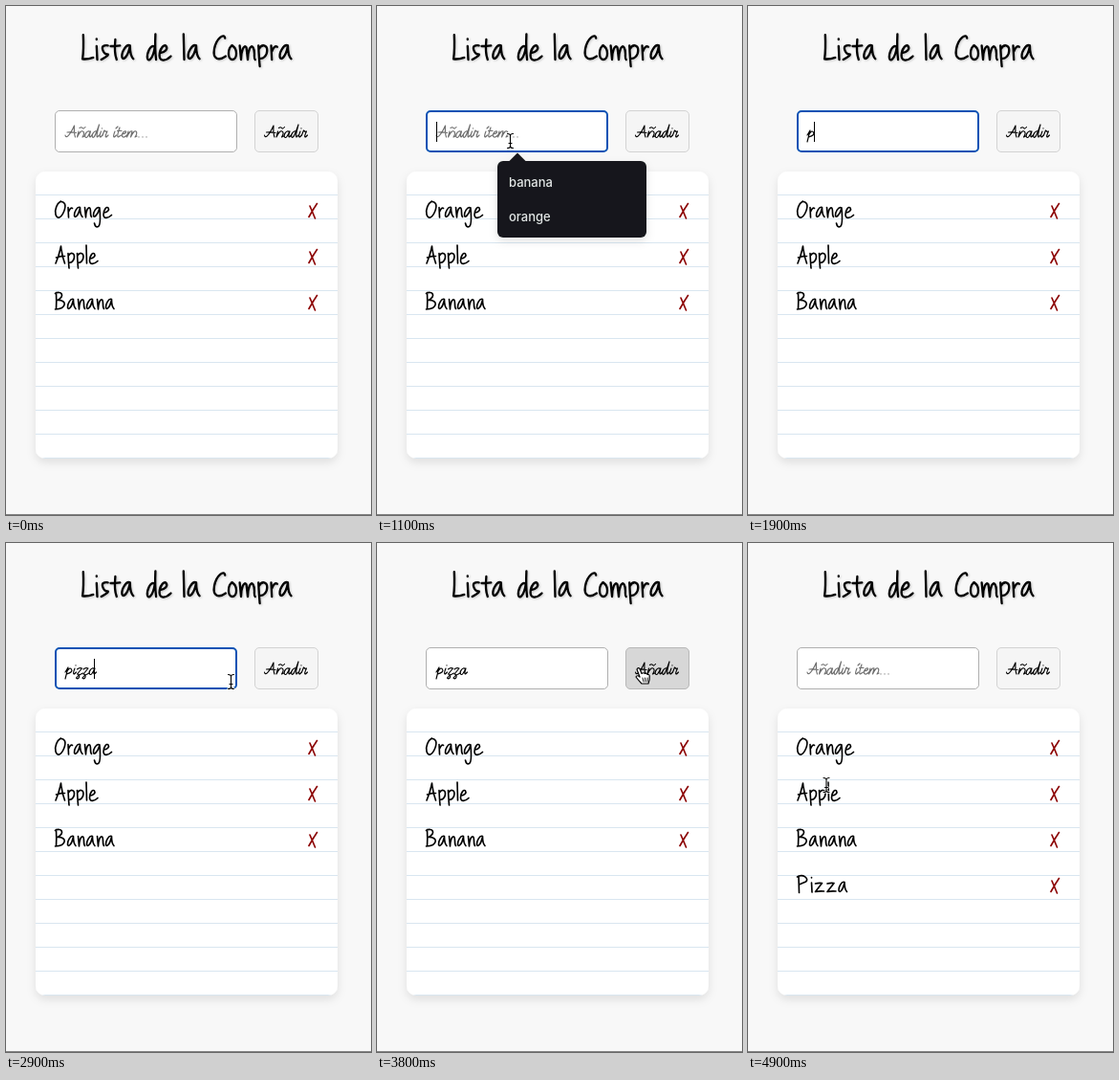
These frames come from a looping animation (382x532 px, 5 s). An HTML page:

```html
<!DOCTYPE html>
<html lang="es">
<head>
<meta charset="utf-8">
<title>Lista de la Compra</title>
<style>
html, body { margin: 0; width: 100%; height: 100%; overflow: hidden; background: #f8f8f8; }
svg { display: block; width: 382px; height: 532px; }
.pen { fill: none; stroke-linecap: round; stroke-linejoin: round; }
.menu { font: 500 13px Inter, Roboto, sans-serif; fill: #e3e5e6; }
</style>
</head>
<body>
<svg id="stage" viewBox="0 0 382 532">
  <defs>
    <clipPath id="sheet"><rect x="31" y="173" width="316" height="300" rx="10"/></clipPath>
    <filter id="soft" x="-10%" y="-10%" width="120%" height="125%">
      <feDropShadow dx="0" dy="4" stdDeviation="5" flood-opacity=".1"/>
    </filter>
    <filter id="glow" x="-10%" y="-30%" width="120%" height="170%">
      <feDropShadow dx="1" dy="1" stdDeviation="1" flood-opacity=".2"/>
    </filter>
  </defs>
  <rect width="382" height="532" fill="#f8f8f8"/>
  <rect y="531" width="382" height="1" fill="#858585"/>
  <rect x="31" y="173" width="316" height="300" rx="10" fill="#fff" filter="url(#soft)"/>
  <g id="rules" clip-path="url(#sheet)" fill="#d9e6f0"></g>
  <g id="heading" filter="url(#glow)"></g>
  <g id="items"></g>
  <rect id="field" fill="#fff"/>
  <g id="entry"></g>
  <rect id="caret" y="121" width="1" height="21"/>
  <rect id="button" x="260.5" y="109.5" width="66" height="43" rx="4.5"/>
  <g id="label"></g>
  <g id="popup" filter="url(#soft)">
    <path d="M138 162.500L147 153.500L156 162.500Z" fill="#15191b"/>
    <rect x="126" y="162" width="156" height="80" rx="6" fill="#15191b"/>
    <text class="menu" x="138" y="189">banana</text>
    <text class="menu" x="138" y="225">orange</text>
  </g>
  <g id="pointer"></g>
</svg>
<script>
const LOOP = 5000, STEP = 100;
const $ = id => document.getElementById(id);

function add(parent, tag, attrs) {
  const node = document.createElementNS("http://www.w3.org/2000/svg", tag);
  for (const key in attrs) node.setAttribute(key, attrs[key]);
  return parent.appendChild(node);
}

// Pen strokes: advance width, then a path on the baseline.
const marker = {
  " ": "8 M0 0",
  A: "13 M1.500 0Q5-8 7-18Q8-8 11 0M2-6Q6-8 11-7.500",
  B: "13 M2-17.500Q2.500-8 2 0M1-16.500C7-20 12-14 3.500-9.500C14-10 13-.5 1 0",
  C: "11 M9.500-16C9-20 3-16 1.500-8S5 1 10-2.500",
  L: "10.5 M2-18.500Q2.500-8 1.500-.5Q5 0 9.500-1.500",
  O: "13 M7-17C3-15 0-8 1.500-3S7 1 10-6S11-17 6-16.500",
  P: "14.5 M2.500-17L3 .5M1-16C7-20 14-14 10-11T3-8",
  X: "11 M2.500-12Q5.500-5 8 1M10-14.500Q5-7 1.500-.5",
  a: "11 M7-10.500C4-12 .5-5 1-2S5-1 7-10Q7-3 9.500-.5",
  d: "9 M6.500-9.500C3-12 .5-4 1-1S5 0 6.500-9M7-19Q6.500-8 7.500 0",
  e: "9.5 M1.500-5C5-5 7.500-8 6-10S1-8 1-3S6 1 9.500-2.500",
  g: "10.5 M7.500-10C4-12 .5-5 1-2S5-2 7.500-9.500Q9 8 6 9.500T2 6",
  i: "4 M1.500-10L2 0M1.500-15v-.5",
  l: "4 M1.500-19L2 0",
  m: "13.5 M1-10.500L2 0C2-6 4-12 6-9L7 0C7-6 9-12 11-9S11-1 12.500 0",
  n: "9 M1-10.500L2 0C2-6 4-11 6-10S6-2 8-.5",
  o: "8.5 M4-10.500C.5-9 0 0 4 0S8-9 3.500-10.500",
  p: "9.5 M1.500-10.500Q2 0 2.500 5M2-8C4-12 8-11 8-7S5 0 2-1",
  r: "7 M1.500-10.500L2 0M2-6Q4-11 6-9.500",
  s: "7.5 M6-10.500Q1-11 2-7.500T5.500-4T1 0",
  t: "8 M4-15Q3-5 5 0M.5-10Q4-10 7.500-10.500",
  z: "12.5 M1.500-9Q5-10 8.500-9.500L1.500-.5Q6-1.500 10.500-1"
};
const hook = "Q4.500 0 6 0L8-2", bowl = "M6-5.500C3-8-.5-2 1 0", arch = "M2-6L.5 0Q4-7.500 ";
const script = {
  " ": "4.5 M0 0",
  ".": "4 M1.500 0v-.3",
  "A": "12.5 M.5-2C1 2 5-1 10-12Q9.500-4 11 0M2.500-5Q7-5.500 12-4.500",
  "ñ": "8 " + arch + "6.500-6T6 0L8-1M3-9.500Q5-11 6-9.500T9-10.500",
  "a": "7.5 " + bowl + "S4.500-2 6.500-6" + hook,
  "d": "7.5 " + bowl + "S5-4 8-13" + hook,
  "e": "5.5 M1-3Q6-4 5-6C3-7 0-3 1-1S4 0 6-2",
  "i": "4 M2.500-6Q0 0 2 0L4-2M3.500-9v-.3",
  "í": "4 M2.500-6Q0 0 2 0L4-2M3.500-9l2-2",
  "m": "11.5 " + arch + "6-6L4.500 0Q8-7.500 10-6T9 0L11-1",
  "p": "8 M.5-2L3.500-7L.5 5M2-2Q5-8 7-5T2 0",
  "r": "6 M0-2L2-7Q4-5 5-6Q2 0 4 0L6-2",
  "t": "5 M3.500-10Q0 0 2 0L5-2M1-6.500H5.500",
  "z": "6.5 M1-5Q3-7 6-6L1 0Q4 0 3 3T0 4Q2 1 7-1"
};

function write(parent, text, x, y, { font = marker, size = 1, color = "#000", pen = 1.65 } = {}) {
  const line = add(parent, "g", {
    class: "pen", role: "img", "aria-label": text, stroke: color, "stroke-width": pen,
    transform: `translate(${x} ${y}) scale(${size})`
  });
  let left = 0;
  for (const letter of text) {
    const [advance, ...path] = font[letter].split(" ");
    add(line, "path", { d: path.join(" "), transform: `translate(${left})` });
    left += +advance;
  }
  return line;
}

for (let y = 197; y < 473; y += 25) add($("rules"), "rect", { x: 31, y, width: 316, height: 1 });
write($("heading"), "Lista de la Compra", 78, 56, { size: 1.4 });

const rows = ["Orange", "Apple", "Banana", "Pizza"].map((name, i) => {
  const row = add($("items"), "g", {});
  write(row, name, 50.5, 221 + 48 * i);
  write(row, "X", 315.5, 221 + 48 * i, { color: "#8b0000" });
  return row;
});

const cursive = { font: script, pen: 1.15 };
write($("label"), "Añadir", 270, 137, cursive);
const hint = write($("entry"), "Añadir ítem...", 61.5, 137, { ...cursive, color: "#6e6e6e" });
const typed = write($("entry"), "pizza", 61.5, 137, cursive);

const beam = "M-3-7.500Q0-7.500 0-5.500Q0-7.500 3-7.500M0-5.500V5.500M-3 7.500Q0 7.500 0 5.500Q0 7.500 3 7.500M-1.500 2.500H1.500";
const shapes = {};
for (const name of ["arrow", "beam", "hand"]) shapes[name] = add($("pointer"), "g", { class: "pen" });
add(shapes.beam, "path", { d: beam, stroke: "#fff", "stroke-width": 2.4 });
add(shapes.beam, "path", { d: beam, stroke: "#000", "stroke-width": 1.1 });
add(shapes.arrow, "path", {
  d: "M0 0V14L3.500 11L6 16.500L8 15.500L5.700 10.300H10Z", fill: "#000", stroke: "#fff"
});
add(shapes.hand, "path", {
  d: "M-6-7Q-4.500-9.500-3-7.500L-1-2.500Q1-4 2.500-2.500Q4-3.500 5-1.500Q7-2 7.200 0Q7.500 4 6 8H-1Q-4 5-7 1Q-6-1.500-3 1Z",
  fill: "#fff", stroke: "#000", "stroke-width": 1.2
});
add(shapes.hand, "path", { d: "M0 2L1 6M2.500 2L3 6M5 2V6", stroke: "#000", "stroke-width": .9 });

// time, shape, x, y
const moves = [
  [0], [100, "arrow", 1, 226], [200, "arrow", 58, 211], [300, "arrow", 118, 192],
  [400, "arrow", 158, 176], [500, "arrow", 147, 161], [600, "beam", 129.5, 148],
  [700, "beam", 136, 143], [800, "beam", 139.5, 141], [1600],
  [2700, "beam", 235.5, 145], [3200, "beam", 238, 144], [3300, "arrow", 250, 136],
  [3400, "hand", 270, 139], [3500, "hand", 277, 139], [3700, "hand", 278, 139],
  [4000, "hand", 279, 139], [4500, "hand", 268, 143], [4600, "arrow", 220, 158],
  [4700, "arrow", 150, 201], [4800, "arrow", 98, 236], [4900, "beam", 82, 253]
];
// time, letters typed, caret position
const keys = [[0, 0, 62], [1600, 1, 69], [2100, 2, 73], [2500, 3, 79], [2700, 4, 85], [2900, 5, 92]];

const latest = (track, t) => track.findLast(entry => entry[0] <= t);
const show = (node, on) => node.setAttribute("display", on ? "inline" : "none");
function set(node, attrs) {
  for (const key in attrs) node.setAttribute(key, attrs[key]);
}

function draw(time) {
  const t = Math.floor(time / STEP) * STEP;
  const focused = t >= 1100 && t < 3800;
  const added = t >= 3900;
  const hover = t >= 3400 && t < 4600;
  const [, count, caretX] = latest(keys, t);
  const [, shape, x, y] = latest(moves, t);

  set($("field"), focused
    ? { x: 52, y: 110, width: 189, height: 42, rx: 4, stroke: "#0b52b4", "stroke-width": 2 }
    : { x: 51.5, y: 109.5, width: 190, height: 43, rx: 4.5, stroke: "#b0b0b0", "stroke-width": 1 });
  set($("button"), hover
    ? { fill: "#d7d7d7", stroke: "#b8b8b8" }
    : { fill: "#f5f5f5", stroke: "#d3d3d3" });

  show(hint, added || count === 0);
  [...typed.children].forEach((letter, i) => show(letter, !added && i < count));
  set($("caret"), { x: caretX });
  show($("caret"), focused && t < 3500);
  show(rows[3], added);

  const fade = Math.min(1, Math.max(0, (1900 - t) / 400));
  show($("popup"), t >= 1100 && fade > 0);
  set($("popup"), { opacity: fade });

  for (const name in shapes) show(shapes[name], name === shape);
  if (shape) set($("pointer"), { transform: `translate(${x} ${y})` });
}

let start;
function tick(now) {
  start ??= now;
  draw((now - start) % LOOP);
  requestAnimationFrame(tick);
}
draw(0);
requestAnimationFrame(tick);
</script>
</body>
</html>
```
